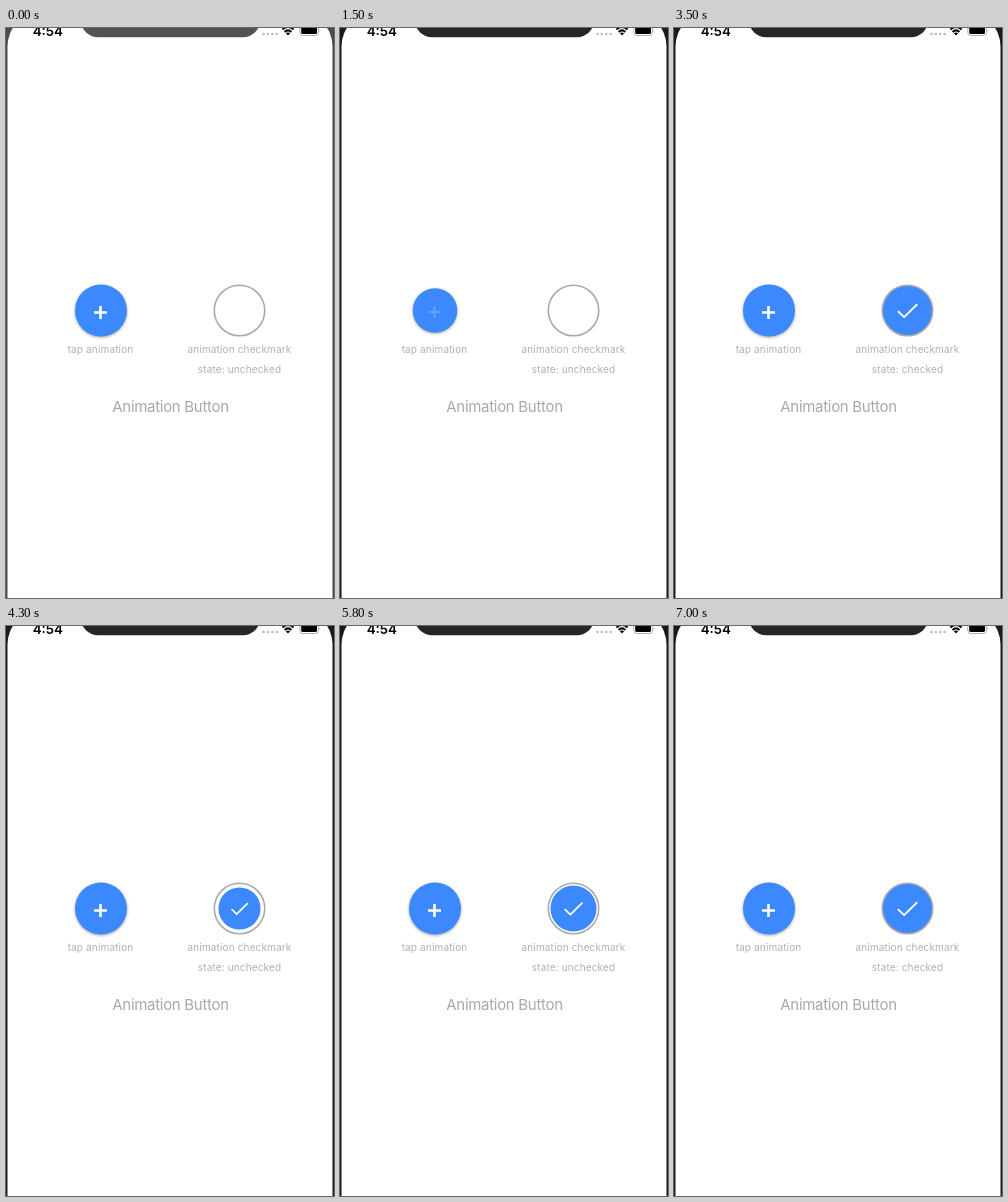
Write an HTML page that moves like this. It is 328 px wide and 570 px high and loops after 8100 ms.

```html
<!DOCTYPE html>
<html lang="en">
<head>
<meta charset="utf-8">
<title>Animation Button</title>
<style>
  html, body { margin: 0; width: 100%; height: 100%; overflow: hidden; }
  svg { display: block; width: 328px; height: 570px; }
  text { font-family: Inter, sans-serif; text-anchor: middle; }
  .label { font-size: 10px; letter-spacing: .015em; fill: #b0b0b0; }
  .line { fill: none; stroke-linecap: round; stroke-linejoin: round; }
  #tap { filter: drop-shadow(0 1.5px 1.8px rgba(0, 0, 0, .36)); }
</style>
</head>
<body>
<svg viewBox="0 0 328 570">
  <rect id="bezel" width="328" height="570"/>
  <rect x="1.5" y="-16" width="325" height="640" rx="34.5" fill="#fff"/>
  <rect id="notch" x="75" y="-30" width="179" height="39.3" rx="17"/>

  <text x="41.8" y="7.6" font-size="13.4" font-weight="600">4:54</text>
  <path class="line" d="M257.5 6h14" stroke="#bbb" stroke-width="2.6" stroke-dasharray="0 4.4"/>
  <g class="line" stroke="#000" stroke-width="2" style="stroke-linecap:butt">
    <path d="M276.4 1.6Q282-3.6 287.6 1.6M278.6 4Q282 .8 285.4 4"/>
  </g>
  <path d="M279.9 5.2Q282 3.6 284.1 5.2L282 7.6Z"/>
  <rect x="293.8" y="-2.5" width="18.6" height="10" rx="2.8" fill="#fff" stroke="#a5a5a5" stroke-width=".9"/>
  <rect x="295.2" y="-1" width="15.8" height="7" rx="1.6"/>
  <path d="M313.6 .8q1.6 1.7 0 3.4z" fill="#a5a5a5"/>

  <g id="tap">
    <circle r="26" fill="#3b89fd"/>
    <path id="plus" d="M-7 2H6M-.5-4.5V8.5" stroke="#fff" stroke-width="2.6"/>
  </g>
  <text class="label" x="94.5" y="325">tap animation</text>

  <g transform="translate(233.5 282.5)">
    <g id="check">
      <circle r="25" fill="#3b89fd"/>
      <path class="line" d="M-9 1.2L-3.4 6.6L9.2-5.8" stroke="#fff" stroke-width="1.9"/>
    </g>
    <circle class="line" r="25.2" stroke="#a9a9a9" stroke-width="1.6"/>
  </g>
  <text class="label" x="233.5" y="325">animation checkmark</text>
  <text class="label" id="state" x="233.5" y="344.5"></text>
  <text x="164.5" y="384" font-size="15" letter-spacing="-.3" fill="#a8a8a8">Animation Button</text>
</svg>
<script>
const LOOP = 8100, STEP = 100;
// [start in ms, number of steps, checked afterwards]
const TOGGLES = [[3300, 3, 1], [4300, 3, 0], [5200, 3, 1], [5800, 4, 0], [6800, 3, 1]];

const $ = id => document.getElementById(id);
const clamp = u => Math.max(0, Math.min(1, u));
const ease = u => { u = clamp(u); return u * u * (3 - 2 * u); };
const easeOut = u => 1 - (1 - clamp(u)) ** 3;
const mix = (a, b, u) => a + (b - a) * u;
const gray = v => `rgb(${v},${v},${v})`;

function draw(t) {
  const since = start => (t - start) / STEP;

  const dim = clamp((since(800) + 1) / 5);
  $('bezel').setAttribute('fill', gray(mix(76, 26, dim)));
  $('notch').setAttribute('fill', gray(mix(82, 38, dim)));

  let scale = 1, alpha = 1;
  if (t >= 1800) {
    const u = (since(1800) + .5) / 5.5;
    scale = mix(.8, 1, easeOut(u));
    alpha = mix(.2, 1, ease(u));
  } else if (t >= 1400) {
    scale = mix(1, .8, ease((since(1400) + .5) / 2.3));
    alpha = .2;
  }
  $('tap').setAttribute('transform', `translate(95 282.5) scale(${scale})`);
  $('plus').setAttribute('opacity', alpha);

  let fill = 0, checked = 0;
  for (const [start, steps, on] of TOGGLES) {
    if (t < start) break;
    const u = ease((since(start) + .55) / (steps - .8));
    fill = on ? u : 1 - u;
    checked = on;
  }
  $('check').setAttribute('transform', `scale(${fill})`);
  $('state').textContent = checked ? 'state: checked' : 'state: unchecked';
}

const begin = performance.now();
function tick() {
  const t = (performance.now() - begin) % LOOP;
  draw(Math.floor(t / STEP) * STEP);
  requestAnimationFrame(tick);
}
tick();
</script>
</body>
</html>
```
